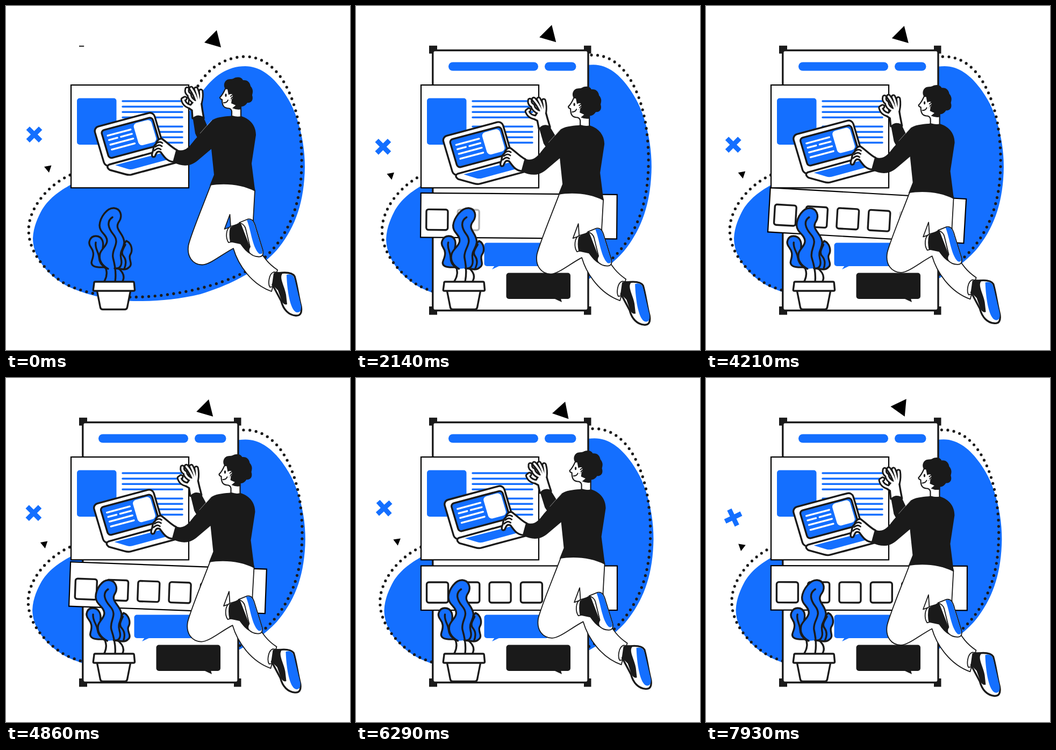
An HTML page that plays this animation: 640 px wide and 640 px high, repeating every 8000 ms.

```html
<!DOCTYPE html>
<html lang="en">
<head>
<meta charset="utf-8">
<title>Page builder illustration</title>
<style>
  html, body { margin: 0; width: 100%; height: 100%; overflow: hidden; background: #fff; }
  svg { display: block; width: 100vw; height: 100vh; }
  .blue { fill: #146fff; }
  .ink { fill: #1a1a1a; }
  .white { fill: #fff; }
  .line { fill: none; stroke: #1a1a1a; stroke-width: 3.4; stroke-linecap: round; stroke-linejoin: round; }
  .paper { fill: #fff; stroke: #1a1a1a; stroke-width: 3.4; stroke-linejoin: round; }
  .leaf { fill: #146fff; stroke: #1a1a1a; stroke-width: 3.4; stroke-linejoin: round; stroke-linecap: round; }
  .card { fill: #fff; stroke: #000; stroke-width: 2.2; }
  .thin { stroke-width: 1.8; }
  .text { fill: none; stroke: #146fff; stroke-width: 3.5; stroke-linecap: round; }
</style>
</head>
<body>
<svg viewBox="0 0 640 640">
  <defs>
    <clipPath id="reveal"><rect id="wipe" x="136" y="73.5"/></clipPath>
    <path id="fingers" d="M347 188Q332 186 329.500 174L333 172M353 180Q341 173 341 165Q335 161 337 154.500M356 178Q352 164 344.500 153.500M359 178Q358 165 353.500 154.500M361 180Q364 169 362.500 158.500" fill="none" stroke-linecap="round" stroke-linejoin="round"/>
  </defs>

  <g id="blob">
    <path class="blue" d="M445 112C482 112 510 145 530 182C548 218 556 262 556 300C555 365 538 414 503 455C468 493 420 518 362 536C320 546 285 549 245 549C200 549 150 539 112 520C77 500 50 468 50 432C51 410 60 392 67 379C82 355 103 342 125 330C190 305 290 310 318 250C330 222 342 185 363 162C386 130 412 112 445 112Z"/>
    <path d="M119 314.5C85 330 50 365 43 405C36 455 75 495 110 517C160 541 215 543 258 541C330 537 400 518 442 496C501 464 545 402 549.500 310C551 285 550 255 545 222C536 170 508 94 444 94C398 96 368 124 350 162" fill="none" stroke="#1a1a1a" stroke-width="5.3" stroke-linecap="round" stroke-dasharray="0 11.65"/>
  </g>

  <path id="cross" d="M-11.700 -11.700L11.700 11.700M-11.700 11.700L11.700 -11.700" stroke="#146fff" stroke-width="9"/>
  <path id="bigTriangle" d="M5 -18.5L-18 4.5L13 13.5Z"/>
  <path id="smallTriangle" d="M-7.5 -3L6 -5.5L1.5 8Z"/>

  <g clip-path="url(#reveal)">
    <path class="ink" d="M136 73.5h15v15h-15zM424 73.5h13.500v15h-13.500zM136 559h15v15.500h-15zM424 559h13.500v15.500h-13.500z"/>
    <rect class="paper" x="142.800" y="82.500" width="289.200" height="484" rx="4"/>
    <g class="blue">
      <rect x="172" y="104.500" width="167" height="16" rx="8"/>
      <rect x="351" y="104.500" width="58.500" height="16" rx="8"/>
      <rect x="238.500" y="440.500" width="120" height="43.500" rx="5"/>
      <path d="M258 483L253 490L268 483Z"/>
    </g>
    <g class="ink">
      <rect x="279.500" y="496.500" width="119.500" height="48.500" rx="5"/>
      <path d="M368 544L383 551L381 544Z"/>
    </g>
  </g>

  <g id="strip">
    <rect class="card" x="121" y="349.500" width="365" height="82.500"/>
    <g id="boxes"></g>
  </g>

  <rect class="card" x="121" y="147" width="219" height="191.300"/>
  <rect class="blue" x="132" y="171.500" width="73.500" height="86.500" rx="5"/>
  <path class="text" d="M217 177H328M217 187.300H328M217 197.300H328M217 207.300H328M217 224.300H328M217 234.300H328M217 244.300H328M217 254.300H328"/>

  <g id="plant">
    <path class="line" d="M183 512C189 501 188 493 184 483M217 512C222 502 217 494 208 487"/>
    <path class="leaf" d="M184 486C165 487 156 484 160 473C164 462 163 456 158 449C151 440 157 428 167 428C180 428 182 441 180 450ZM224 437C233 441 237 454 231 463C227 471 237 480 229 486C226 489 222 490 219 490L203 488L216 447Z"/>
    <path class="leaf" d="M190 489C177 482 172 471 175 460C179 450 188 446 188 437C188 425 174 422 174 408C175 393 188 375 201 376C213 377 217 390 211 400C199 416 220 422 220 440C219 453 211 455 214 470C217 482 212 490 202 488"/>
    <path class="line" d="M198 393C186 401 191 414 199 424C214 442 196 450 199 468C204 487 205 500 203 512M167 440C165 451 172 457 173 467C174 479 179 482 184 487M222 444C217 453 213 460 219 466C225 474 223 482 220 489"/>
  </g>
  <path class="paper" d="M169 528L175.500 561Q176.500 564.500 180 564.500H221Q224.500 564.500 225.500 561L232 528Z"/>
  <path class="paper" d="M166 513H236Q238 513 238.300 515L239.500 528Q239.500 530 237 530H164.500Q162 530 162.300 528L164 515Q164 513 166 513Z"/>

  <g id="person">
    <g transform="translate(163 226.500) rotate(-15) skewX(1.500)">
      <rect class="paper" width="115" height="76" rx="9"/>
      <rect class="leaf" x="11.500" y="9" width="98.500" height="54" rx="6"/>
      <rect class="white" x="72" y="12" width="34" height="43" rx="7"/>
      <path d="M21 21H65M21 29.500H37M44 29.500H65M21 38.500H65M21 48H65" stroke="#fff" stroke-width="3.400" stroke-linecap="round"/>
    </g>
    <path class="paper" d="M192 295L290 268L322 271L325 289L234 313.500Q229 315 222 313L193 305Q185 299 192 295Z"/>
    <path class="blue" d="M203 296L288 274L315 282L236 303.500Q231 304.500 226 303Z"/>

    <g id="arm">
      <use href="#fingers" stroke="#1a1a1a" stroke-width="9.600"/>
      <path class="paper" d="M347 209L346 194L339 189L351 175L363 176C364 184 365 192 368 209Z"/>
      <use href="#fingers" stroke="#fff" stroke-width="3.600"/>
      <path class="ink" d="M347.500 208Q356 200 367 206L377 229L362 251Q356 247 352 237Z"/>
    </g>

    <path class="paper thin" fill-rule="evenodd" d="M381 333C365 375 344 425 339.500 445C336 466 347 481 365 481.500C380 481 400 463 423 451C432 482 457 518 494 531L505 491C490 481 478 469 462 436L460 397L463 343L455 320L390 320Z M416.500 388L406.500 415L418 411Z"/>

    <path class="paper thin" d="M418 410C409 414 408 431 414 440L426 437L428 407Z"/>
    <path class="ink" d="M417 412L436 402L453 446C455 453 451 456 456 462C448 459 442 451 436 443L417 439Q414 425 417 412Z"/>
    <path class="paper thin" d="M434 403L450 396.500C458 395 462 401 465 413L478 455Q480 467 470 466.500Q459 466 453 459Q450 454 454 448L446 415Q444 406 434 403Z"/>
    <path class="blue" d="M448 398C457 395 461 401 464 413L477 454Q479 463 471 461C458 449 456 417 448 398Z"/>

    <path class="paper thin" d="M498 495C489 498 487 517 491 523L501 521L506 496Z"/>
    <path class="paper" d="M506 497C520 495 533 496 537 503C542 520 544 540 549 559Q552 577 539 576C526 575 516 565 512 549L496 519Z"/>
    <path class="ink" d="M498 497Q507 493 515 497C507 505 518 520 521 537L523 555Q517 557 513 549L506 529L495 518Z"/>
    <path class="blue" d="M522 500C532 497 536 502 538 512L549 558Q550 571 541 570C529 567 523 531 522 500Z"/>

    <path class="paper" style="stroke-width:2.200" d="M408 154C405 161 402 166 398 170Q398 173 402 174C402 185 405 189 412 190Q419 190 420 196V207H437V180L428 150Z"/>
    <path class="ink" d="M421 190L438 176V192Q430 194 421 190Z"/>
    <path class="ink" d="M408 154C403 147 407 136 417 136Q421 136 423 135C430 131 438 132 441 138C449 137 454 142 455 149C461 156 459 161 458 166C461 175 456 181 449 180C444 188 438 188 430 186L419 181L420 174L416 176L412 155Z"/>
    <path class="white" d="M413 166Q420 161 423 167Q422 175 414 176Z"/>
    <path class="line" style="stroke-width:2" d="M418 168Q423 163 423 168L419 172M405 180Q411 180 413 175"/>
    <ellipse class="ink" cx="409" cy="166" rx="1.600" ry="3"/>

    <path class="ink" d="M384 212C396 205 409 206 421 204Q430 207 438 205C456 211 465 224 465 240L457 293L463.500 345C440 332 406 329 379 334L387 314L382 266L356 288C343 299 328 299 312 291L318 267C334 273 342 260 351 249Z"/>
    <path d="M361 237L383 212" stroke="#bbb" stroke-width=".7"/>

    <path class="paper" d="M318 268C309 264 299 253 290 247C284 246 280 252 279 257C273 261 275 266 273 271C270 278 272 283 277 280C280 272 282 269 288 272C294 280 299 289 312 290Z"/>
    <path class="line" style="stroke-width:2.800" d="M281 255Q286 251 291 255M278 262Q285 256 290 261M276 269Q283 262 288 267"/>
  </g>
</svg>

<script>
  const LOOP = 8000, FLOAT = 6000;
  const el = id => document.getElementById(id);
  const place = (id, transform) => el(id).setAttribute('transform', transform);
  const clamp = x => Math.max(0, Math.min(1, x));

  const blobWidth = [[0, 1], [700, 1.018], [930, 1.015], [1290, .984], [1790, .979], [2570, .972], [3070, .97],
    [4210, .992], [5570, 1.016], [5850, 1.017], [7070, .943], [7930, .978]];
  const blobHeight = [[0, 1], [1290, 1.007], [3070, 1.018], [4210, 1], [5570, .977], [7070, 1.023], [7930, .99]];
  const armSwing = [[0, 0], [1450, 1], [3070, .18], [3640, .05], [4210, .15], [5920, .9], [7070, .43], [7930, .12]];
  const plantLean = [[0, 0], [1290, 6], [2200, 7.5], [3070, 4.5], [4210, -6], [4900, -8], [5570, -6], [7070, 1.5], [7930, 5]];

  function track(keys, t) {
    const i = keys.findIndex(k => k[0] > t);
    if (i < 0) return keys[keys.length - 1][1];
    const [t0, a] = keys[i - 1], [t1, b] = keys[i];
    return a + (b - a) * (t - t0) / (t1 - t0);
  }

  for (let i = 0; i < 5; i++) {
    const box = document.createElementNS('http://www.w3.org/2000/svg', 'rect');
    const attrs = { class: 'line', x: 131.5 + i * 58.3, y: 380, width: 40, height: 38, rx: 4 };
    for (const name in attrs) box.setAttribute(name, attrs[name]);
    el('boxes').append(box);
  }

  function draw(t) {
    const phase = t % FLOAT;
    const rise = 1 - Math.abs(phase / (FLOAT / 2) - 1);
    const spin = Math.max(0, t - FLOAT) / 100;
    const drift = (id, x, y, dx, dy) =>
      place(id, `translate(${x + dx * rise} ${y + dy * rise}) rotate(${spin})`);

    drift('cross', 52.5, 239, -3, 32);
    drift('bigTriangle', 387, 63.5, -39, -13.5);
    drift('smallTriangle', 78.5, 302, -19, 18.5);
    place('person', `translate(${-4 * rise} ${24 * rise})`);
    place('arm', `rotate(${-11.3 * track(armSwing, t)} 362 240)`);
    place('blob', `translate(302.5 331) scale(${track(blobWidth, t)} ${track(blobHeight, t)}) translate(-302.5 -331)`);

    const lean = Math.atan(track(plantLean, t) / 115) * 180 / Math.PI;
    place('plant', `translate(0 512) skewX(${-lean}) translate(0 -512)`);

    el('wipe').setAttribute('width', Math.min(302, 9 + .156 * t));
    el('wipe').setAttribute('height', Math.min(502, 2 + .268 * t));

    // The strip swings out and back once per float cycle, after the page is open.
    const tilt = 3.8 * clamp(1 - Math.abs(phase - 3940) / 2065);
    place('strip', `rotate(${tilt} 320 322)`);
    el('strip').setAttribute('opacity', clamp((t - 1875) / 200));
    [...el('boxes').children].forEach((box, i) =>
      box.setAttribute('opacity', clamp((t - 1350 - i * 700) / 280)));
  }

  function frame() {
    draw(performance.now() % LOOP);
    requestAnimationFrame(frame);
  }
  frame();
</script>
</body>
</html>
```
